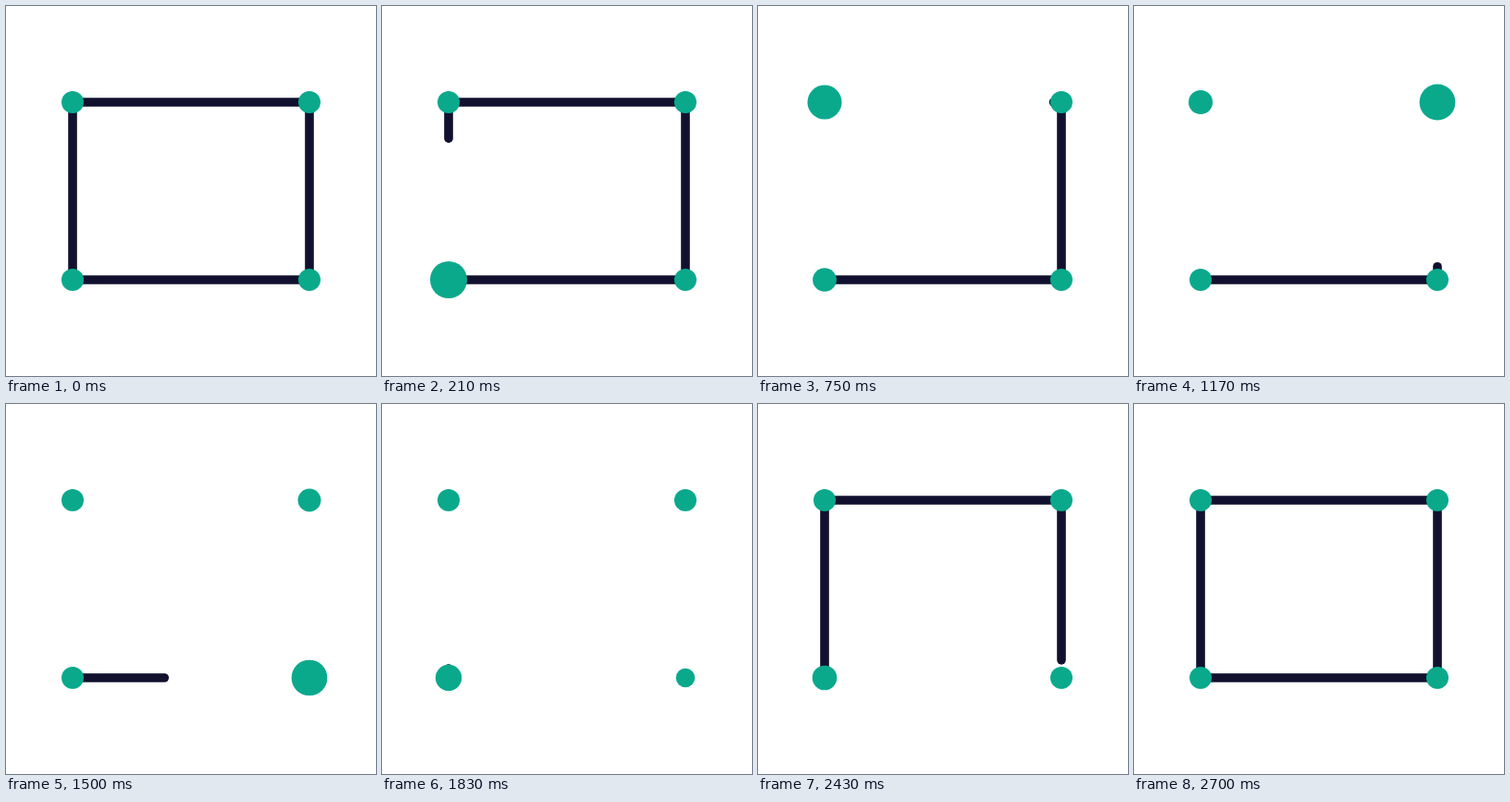
An HTML page that plays this animation: 400 by 400 pixels, repeating every 2.73 s.

```html
<!DOCTYPE html>
<html lang="en">
<head>
<meta charset="utf-8">
<title>Rectangle loop</title>
<style>
  html, body { margin: 0; height: 100%; overflow: hidden; background: #fff; }
  svg { display: block; width: 100%; height: 100%; }
  line { stroke: #11112f; stroke-width: 9.6; stroke-linecap: round; }
  circle { fill: #0aa98c; }
</style>
</head>
<body>
<svg viewBox="0 0 400 400"></svg>
<script>
const TICK = 30, LOOP = 91, STAGE = 15, DRAW_START = 60, DRAW_EDGE = 7.5;
const corners = [[72, 296], [72, 104], [328, 104], [328, 296]];
const svg = document.querySelector('svg');

const add = name => svg.appendChild(document.createElementNS('http://www.w3.org/2000/svg', name));
const set = (el, attrs) => { for (const key in attrs) el.setAttribute(key, attrs[key]); };
const clamp = u => Math.min(1, Math.max(0, u));
const mix = (a, b, u) => a + (b - a) * u;

const sineOut = u => Math.sin(u * Math.PI / 2);
const smooth = u => u * u * (3 - 2 * u);

const lines = corners.map(() => add('line'));
const dots = corners.map(([cx, cy]) => {
  const dot = add('circle');
  set(dot, { cx, cy });
  return dot;
});

// Radius of a dot, p ticks after its pulse began
function pulse(p) {
  if (p <= 0 || p >= 28) return 12;
  const u = p % 7 / 7;
  if (p < 7) return mix(12, 20, 1 - (1 - u) ** 2);
  if (p < 14) return mix(20, 10, u ** 2.3);
  if (p < 21) return mix(10, 13.3, u * u);
  return mix(13.3, 12, u * u);
}

function render() {
  const t = performance.now() / TICK % LOOP;
  const drawing = t >= DRAW_START;

  corners.forEach(([x1, y1], i) => {
    const [x2, y2] = corners[(i + 1) % 4];
    const from = drawing ? 0 : sineOut(clamp((t - i * STAGE) / 12));
    const to = drawing ? smooth(clamp((t - DRAW_START) / DRAW_EDGE - i)) : 1;
    set(lines[i], {
      x1: mix(x1, x2, from), y1: mix(y1, y2, from),
      x2: mix(x1, x2, to), y2: mix(y1, y2, to),
      visibility: to - from > 1e-4 ? 'visible' : 'hidden'
    });
    const start = i === 0 && drawing ? DRAW_START : i * STAGE;
    set(dots[i], { r: pulse(t - start) });
  });
  requestAnimationFrame(render);
}
render();
</script>
</body>
</html>
```
